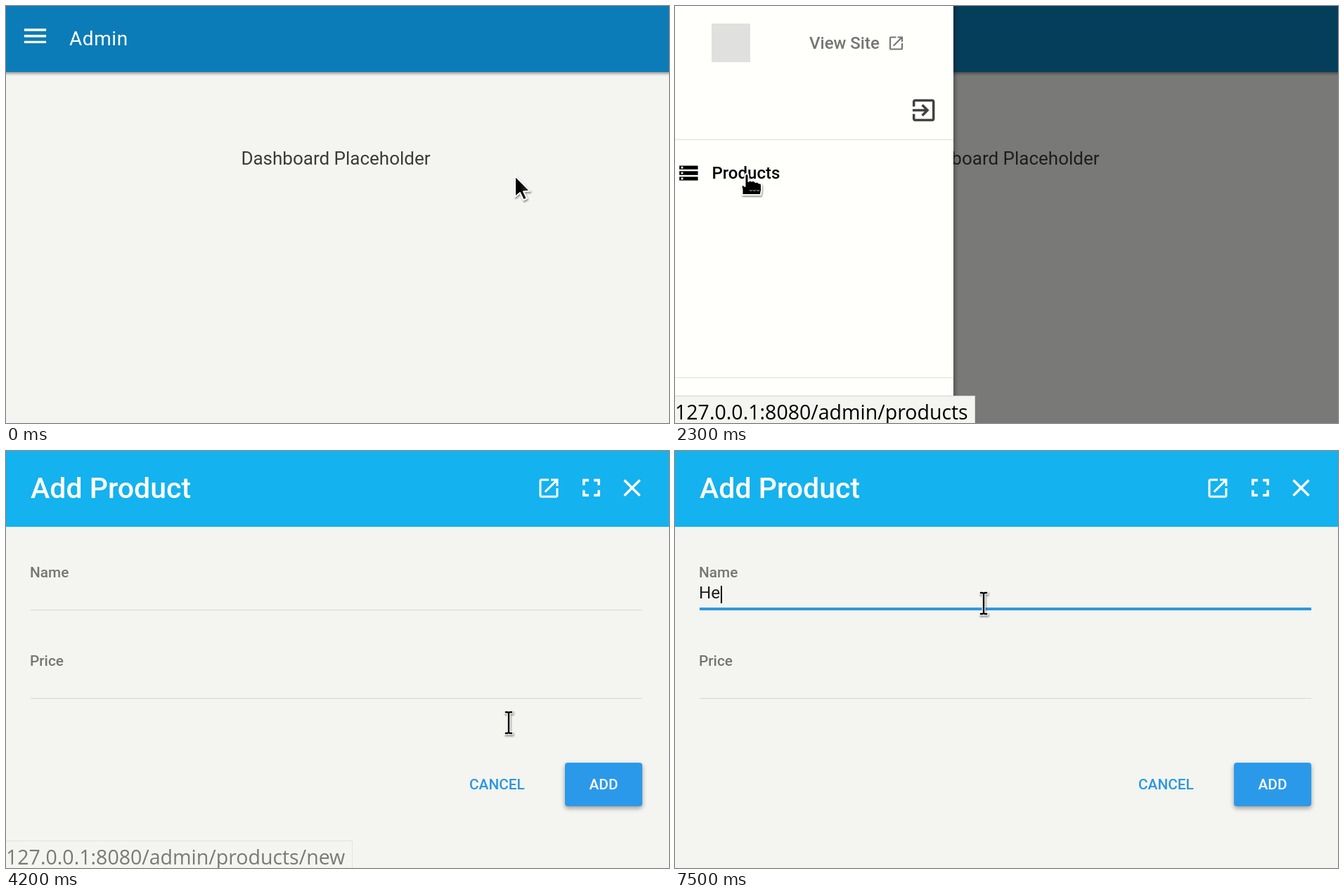
These frames come from a looping animation (943 px wide and 594 px high, 8000 ms). An HTML page:

```html
<!DOCTYPE html>
<html lang="en">
<head>
<meta charset="utf-8">
<title>Admin walkthrough</title>
<style>
  html, body { margin: 0; width: 100%; height: 100%; overflow: hidden; background: #f4f4f0; }
  #stage { position: absolute; left: 0; top: 0; display: block; }
  text { font-family: Roboto, sans-serif; white-space: pre; }
  .m { font-weight: 500; }
  .ui { font-family: "Open Sans", "Noto Sans", sans-serif; }
  .title { font-size: 28px; letter-spacing: .56px; fill: #fff; }
  .body { font-size: 26px; fill: #3b3b39; text-anchor: middle; }
  .nav { font-size: 24px; }
  .foot { font-size: 24.3px; fill: #424240; }
  .label { font-size: 20.8px; fill: #757572; }
  .drop { filter: drop-shadow(0 3px 3px rgba(0,0,0,.36)); }
  .bar { filter: drop-shadow(0 2px 2px rgba(0,0,0,.45)); }
  .side { filter: drop-shadow(2px 0 3px rgba(0,0,0,.4)); }
  .pop { filter: drop-shadow(0 2px 5px rgba(0,0,0,.34)); }
  .cur { filter: drop-shadow(1px 2px 1px rgba(0,0,0,.4)); }
</style>
</head>
<body>
<svg id="stage" width="943" height="594" viewBox="0 0 943 594">
  <defs>
    <linearGradient id="ink" x1="0" y1="0" x2="1" y2="0">
      <stop offset=".3" stop-color="#000"/><stop offset="1" stop-color="#444"/>
    </linearGradient>
  </defs>
  <rect width="943" height="594" fill="#f4f4f0"/>

  <rect class="bar" x="-10" y="-10" width="963" height="104" fill="#0b7cb7"/>
  <g id="menu" fill="#fff"></g>
  <g id="dash">
    <text class="title" x="90" y="56">Admin</text>
    <text class="body" x="469" y="226">Dashboard Placeholder</text>
    <rect id="focus" x=".5" y="4.5" width="83" height="83" fill="none" stroke="#fff" stroke-dasharray="1 1"/>
  </g>
  <g id="list">
    <text class="title" x="89.5" y="56">Products</text>
    <g id="search" fill="#fff"></g>
    <text class="body" x="469" y="226">No products to show.</text>
    <circle class="drop" cx="843" cy="496" r="48" fill="#2b99e9"/>
    <g id="plus" fill="#fff"></g>
  </g>

  <rect id="shade" width="943" height="594"/>
  <g id="drawer">
    <rect class="side" x="-20" y="-20" width="416" height="634" fill="#fffffc"/>
    <rect x="52" y="25" width="55" height="55" fill="#e0e1de"/>
    <text class="nav m" x="191" y="61" fill="#757572">View Site</text>
    <path d="M0 190.5H396M0 529.5H396" stroke="#dededb"/>
    <text class="nav m" x="52.5" y="246">Products</text>
    <text class="foot" x="10.5" y="573">Powered by</text>
    <text class="foot m" x="142.5" y="573" style="fill:#1fabdc">QOR</text>
    <rect x="143" y="575" width="49" height="1.5" fill="#1fabdc"/>
  </g>

  <g id="panel">
    <rect class="side" width="963" height="614" fill="#f4f4f0"/>
    <rect width="943" height="108" fill="#14b2ee"/>
    <text class="m" x="35" y="67" font-size="41" fill="#fff">Add Product</text>
    <g id="tools" fill="#fff"></g>
    <text class="label m" x="34" y="180">Name</text>
    <text class="label m" x="34" y="306">Price</text>
    <path d="M35 226.5H905M35 352.5H905" stroke="#d6d6d3"/>
    <rect id="line" y="223" height="4" fill="#2f98df"/>
    <text id="typed" x="34" y="210" font-size="24.3" fill="#1e1e1d"></text>
    <rect id="caret" y="192" width="2" height="25"/>
    <text class="label m" x="659" y="482" style="fill:#2b98e0">CANCEL</text>
    <rect class="drop" x="795" y="444" width="110" height="62" rx="4" fill="#2b99e9"/>
    <text class="label m" x="829.5" y="482" style="fill:#fff">ADD</text>
  </g>

  <g id="popup">
    <rect class="pop" x="9.5" y="202.5" width="868" height="73" fill="#fffffc" stroke="#c9c9c6"/>
    <rect id="row" x="12" width="863" height="34"/>
    <svg x="11" y="204" width="866" height="69" font-size="28.7">
      <text class="ui" x="8" y="30">Hello World</text>
      <text class="ui" x="8" y="64">Cheap Ring</text>
    </svg>
  </g>

  <g id="status">
    <rect id="tip" x="-1" y="555.5" height="40" fill="#f4f4f0" stroke="#d2d2cf"/>
    <text id="url" class="ui" x="0" y="589" font-size="28.5"></text>
  </g>

  <g id="cursor" class="cur">
    <path id="arrow" d="M1 2V32L8 26L13 36.5L18 34.2L13.2 24.2L22.5 23.5Z" fill="url(#ink)" stroke="#fff" stroke-width="2" stroke-linejoin="round"/>
    <path id="hand" d="M-2.5 4Q-2.5 1 0 1T2.5 4V12Q4 9.500 7 11.500Q10 9.500 12.500 13Q15.500 11.500 17.500 14.500Q21 13.500 21 18V25Q20 27 20 31H-6.500V24L-7.500 19Q-5.500 15-2.500 19Z" fill="#000" stroke="#fff" stroke-width="2" stroke-linejoin="round"/>
    <path id="dents" d="M4 24q2 3 4 0M9 24q2 3 4 0M14 24q2 3 4 0" fill="none" stroke="#bbb"/>
    <g id="beam" fill="none" stroke-linecap="square">
      <path d="M-4-15H4M0-15V15M-4 15H4" stroke="#fff" stroke-width="5"/>
      <path d="M-4-15H-1.500L0-14L1.500-15H4M0-14V14M-4 15H-1.500L0 14L1.500 15H4" stroke="#000" stroke-width="2.4"/>
    </g>
  </g>
</svg>
<script>
const LOOP = 8000, STEP = 100;
const $ = id => document.getElementById(id);

// 24-unit icon glyphs, placed by their centre
const ICON = {
  menu: 'M3 18h18v-2H3zM3 13h18v-2H3zM3 6v2h18V6z',
  search: 'M15.5 14h-.79l-.28-.27C15.41 12.59 16 11.11 16 9.5 16 5.91 13.09 3 9.5 3S3 5.91 3 9.5 5.91 16 9.5 16c1.61 0 3.09-.59 4.23-1.57l.27.28v.79l5 4.99L20.49 19zm-6 0C7.01 14 5 11.99 5 9.5S7.01 5 9.5 5 14 7.01 14 9.5 11.99 14 9.5 14z',
  plus: 'M19 13h-6v6h-2v-6H5v-2h6V5h2v6h6z',
  open: 'M19 19H5V5h7V3H5c-1.11 0-2 .9-2 2v14c0 1.1.89 2 2 2h14c1.1 0 2-.9 2-2v-7h-2zM14 3v2h3.59l-9.83 9.83 1.41 1.41L19 6.41V10h2V3z',
  full: 'M7 14H5v5h5v-2H7zM5 10h2V7h3V5H5zM17 17h-3v2h5v-5h-2zM14 5v2h3v3h2V5z',
  close: 'M19 6.41L17.59 5 12 10.59 6.41 5 5 6.41 10.59 12 5 17.59 6.41 19 12 13.41 17.59 19 19 17.59 13.41 12z',
  exit: 'M10.09 15.59L11.5 17l5-5-5-5-1.41 1.41L12.67 11H3v2h9.67zM19 3H5c-1.11 0-2 .9-2 2v4h2V5h14v14H5v-4H3v4c0 1.1.89 2 2 2h14c1.1 0 2-.9 2-2V5c0-1.1-.9-2-2-2z',
  rows: 'M2 20h20v-4H2zm2-3h2v2H4zM2 4v4h20V4zm4 3H4V5h2zM2 14h20v-4H2zm2-3h2v2H4z'
};
function icon(parent, name, cx, cy, scale, fill) {
  const p = document.createElementNS('http://www.w3.org/2000/svg', 'path');
  p.setAttribute('d', ICON[name]);
  p.setAttribute('transform', `translate(${cx} ${cy}) scale(${scale}) translate(-12 -12)`);
  if (fill) p.setAttribute('fill', fill);
  $(parent).append(p);
}
icon('menu', 'menu', 41.5, 42.7, 1.733);
icon('search', 'search', 237.6, 46.8, 1.733);
icon('plus', 'plus', 842.8, 495.3, 1.733);
icon('tools', 'open', 772, 53, 1.5);
icon('tools', 'full', 832.5, 52.3, 1.78);
icon('tools', 'close', 890.5, 52.5, 1.75);
icon('drawer', 'open', 314.5, 53, 1.06, '#757572');
icon('drawer', 'exit', 353.7, 148.5, 1.75, '#424240');
icon('drawer', 'rows', 19.4, 238, 1.32, '#000');

// Step tables: [start ms, value...]
const CURSOR = [
  [0, 'arrow', 723, 240], [700, 'arrow', 690, 231], [800, 'arrow', 520, 178],
  [900, 'arrow', 290, 108], [1000, 'arrow', 110, 56], [1100, 'arrow', 32, 38],
  [1200, 'hand', 20, 35], [1400, 'arrow', 20, 35], [1700, 'arrow', 32, 70],
  [1800, 'arrow', 62, 145], [1900, 'arrow', 94, 218], [2000, 'hand', 102, 238],
  [2800, 'arrow', 102, 238], [3200, 'arrow', 350, 232], [3300, 'arrow', 680, 330],
  [3400, 'arrow', 845, 420], [3600, 'hand', 845, 468], [3700, 'hand', 843, 488],
  [4100, 'arrow', 785, 444], [4200, 'beam', 715, 387], [4300, 'beam', 640, 310],
  [4400, 'beam', 590, 262], [4800, 'beam', 500, 232], [4900, 'beam', 439, 217],
  [6000, 'arrow', 439, 215], [7500, 'beam', 439, 217]
];
const DRAWER = [[0, 0], [1400, .01], [1500, .72], [1600, 1], [2400, 0]];
const PANEL = [[0, 1], [3900, .6], [4000, .14], [4100, 0]];
const LINE = [[0, 0], [5000, 210], [5100, 427], [5500, 435]];
const TYPED = [[0, ''], [5700, 'H'], [5900, 'He']];
const CARET = [[0, 0], [5000, 1], [6200, 0], [7400, 1]];
const POPUP = [[0, 0], [5800, .6], [5900, 1], [7400, .5], [7500, 0]];
const ROW = [[0, 205, 'none'], [6000, 205, '#ebece8'], [6600, 205, '#e2e3df'], [7100, 239, '#e2e3df']];
const STATUS = [[0, 0], [2100, .5], [2200, 1], [2600, .4], [2700, 0],
  [3600, .5], [3700, 1], [4200, .5], [4300, .2], [4400, 0]];

const at = (table, t) => table.findLast(row => row[0] <= t).slice(1);
const show = (id, on) => $(id).style.display = on ? '' : 'none';
const set = (id, attrs) => { for (const k in attrs) $(id).setAttribute(k, attrs[k]); };

function draw(t) {
  const onDash = t < 2400;
  show('dash', onDash);
  show('list', !onDash);
  show('focus', t >= 1400);

  const [open] = at(DRAWER, t);
  set('shade', { opacity: open / 2 });
  show('drawer', open > .1);
  set('drawer', { transform: `translate(${396 * (open - 1)} 0)` });

  const [off] = at(PANEL, t);
  show('panel', off < 1);
  set('panel', { transform: `translate(${943 * off} 0)` });

  const [half] = at(LINE, t), [text] = at(TYPED, t);
  set('line', { x: 470 - half, width: half * 2 });
  $('typed').textContent = text;
  show('caret', at(CARET, t)[0]);
  set('caret', { x: [35, 52, 65][text.length] });

  const [pop] = at(POPUP, t), [y, fill] = at(ROW, t);
  show('popup', pop);
  set('popup', { opacity: pop });
  set('row', { y, fill });

  const late = t >= 3000;
  set('status', { opacity: at(STATUS, t)[0] });
  set('tip', { width: late ? 493.5 : 427.5 });
  $('url').textContent = '127.0.0.1:8080/admin/products' + (late ? '/new' : '');

  const [kind, cx, cy] = at(CURSOR, t);
  for (const id of ['arrow', 'hand', 'beam']) show(id, id === kind);
  show('dents', kind === 'hand');
  set('cursor', { transform: `translate(${cx} ${cy})` });
}

const start = performance.now();
function tick() {
  const t = (performance.now() - start) % LOOP;
  draw(Math.floor(t / STEP) * STEP);
  requestAnimationFrame(tick);
}
tick();
</script>
</body>
</html>
```
